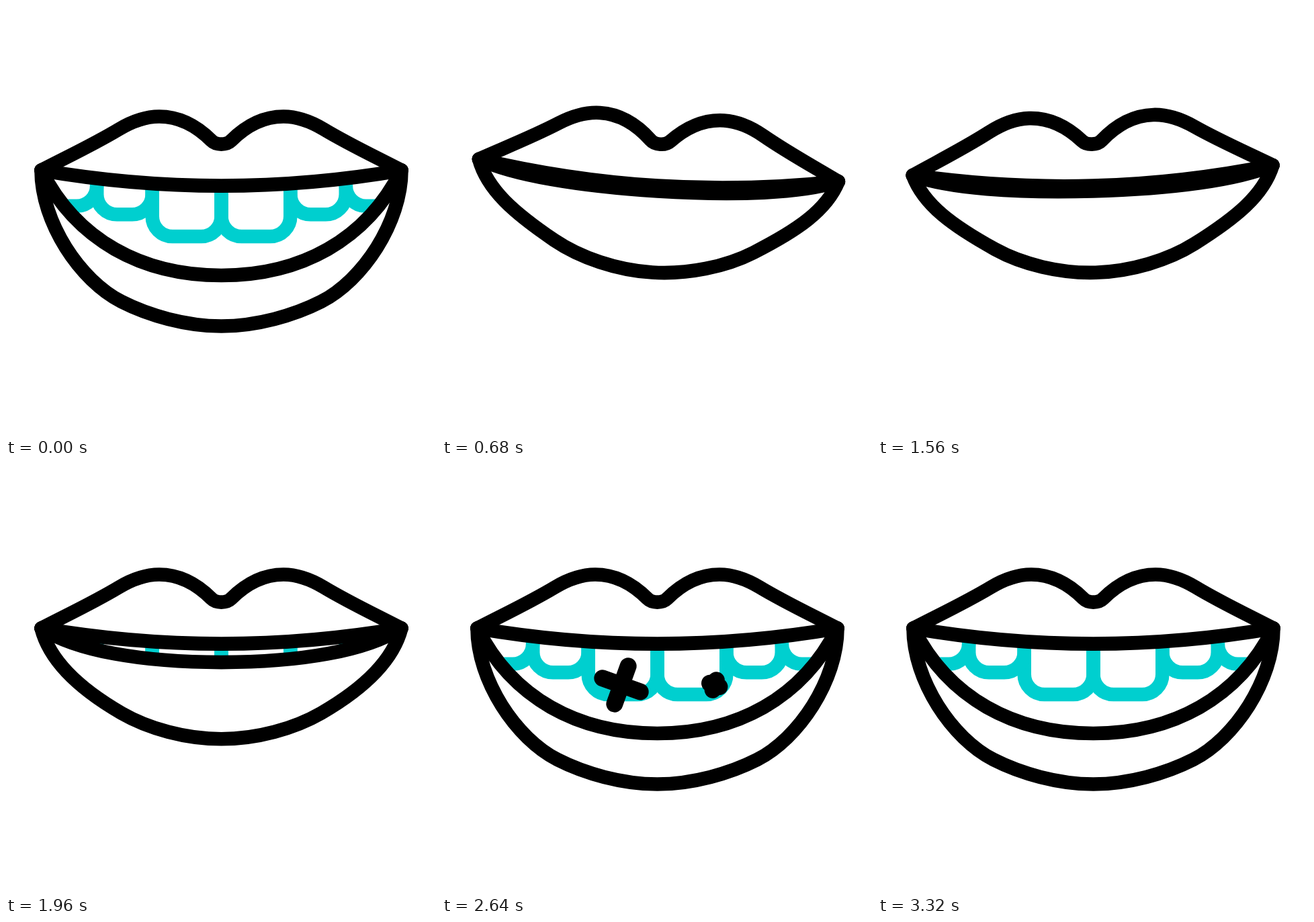
Write an HTML page with a canvas that moves like this. It is 640 by 640 pixels and loops after 3.68 s.

```html
<!DOCTYPE html>
<html lang="en">
<head>
<meta charset="utf-8">
<title>Smile</title>
<style>
  html, body { margin: 0; width: 100%; height: 100%; overflow: hidden; background: #fff; }
  canvas { display: block; width: 640px; height: 640px; }
</style>
</head>
<body>
<canvas id="stage" width="640" height="640"></canvas>
<script>
const ctx = document.getElementById('stage').getContext('2d');
const LOOP = 3680, STEP = 40;
const INK = '#000', TEAL = '#00cfcf', LINE = 20.6;
const MID = 320.5, EDGE = 52.5, TOP = 244.5, PIVOT = 276;

const mix = (a, b, k) => a + (b - a) * k;

function ramp(t, start, length) {
  const u = Math.min(1, Math.max(0, (t - start) / length));
  return u * u * (3 - 2 * u);
}

// Motion
const shutAt = t => ramp(t, 0, 480) - ramp(t, 1840, 480);

// Five equal swings, the extremes going 4, -4, 2, -2 degrees and back to rest.
function tiltAt(t) {
  const start = 360, swing = 280;
  const extreme = i => i < 1 || i > 4 ? 0 : (i % 2 ? 4 : -4) / Math.ceil(i / 2);
  const i = Math.floor((t - start) / swing);
  const angle = mix(extreme(i), extreme(i + 1), ramp(t, start + i * swing, swing));
  return angle * Math.PI / 180;
}

function markSizeAt(t, i) {
  const start = 2340 + 180 * i;
  return ramp(t, start, 400) - ramp(t, start + 460, 320);
}

// Each curve is a left half of cubic points, mirrored at the middle.
const mirror = pts =>
  pts.concat(pts.slice(0, -1).reverse().map(([x, y]) => [2 * MID - x, y]));

// Smooth curve through nodes of x, y and slope
function spline(nodes) {
  const pts = [nodes[0].slice(0, 2)];
  for (let i = 1; i < nodes.length; i++) {
    const [x0, y0, s0] = nodes[i - 1], [x1, y1, s1] = nodes[i];
    const h = (x1 - x0) / 3;
    pts.push([x0 + h, y0 + h * s0], [x1 - h, y1 - h * s1], [x1, y1]);
  }
  return mirror(pts);
}

const upperLip = spline([
  [EDGE, TOP, -0.52], [168, 183.5, -0.6], [228, 164.5, 0], [306, 200.5, 1], [MID, 205.6, 0]
]);
const mouthLine = spline([[EDGE, TOP, 0.172], [MID, 267.6, 0]]);

function innerLip(shut) {
  const sag = mix(156.5, 31, shut);
  return mirror([[EDGE, TOP], [EDGE * 2, TOP + sag * 0.668], [203, TOP + sag], [MID, TOP + sag]]);
}

function outerLip(shut) {
  const low = mix(476.5, 396.8, shut);
  const hipX = 172, hipY = mix(440, 358, shut), slope = mix(0.51, 0.59, shut);
  return mirror([
    [EDGE, TOP], [EDGE + 15 * shut, mix(322, 289, shut)],
    [hipX - 62, hipY - 62 * slope], [hipX, hipY], [hipX + 40, hipY + 40 * slope],
    [268, low], [MID, low]
  ]);
}

// Drawing
function curve(pts, join) {
  if (join) ctx.lineTo(...pts[0]);
  else ctx.moveTo(...pts[0]);
  for (let i = 1; i < pts.length; i += 3) {
    ctx.bezierCurveTo(...pts[i], ...pts[i + 1], ...pts[i + 2]);
  }
}

function strokeCurve(pts) {
  ctx.beginPath();
  curve(pts);
  ctx.stroke();
}

function drawTooth(near, far, bottom) {
  ctx.beginPath();
  ctx.moveTo(MID + near, 240);
  ctx.arcTo(MID + near, bottom, MID + far, bottom, 30);
  ctx.arcTo(MID + far, bottom, MID + far, 240, 30);
  ctx.lineTo(MID + far, 240);
  ctx.stroke();
}

function drawTeeth(inner) {
  ctx.save();
  ctx.beginPath();
  curve(mouthLine);
  curve(inner.slice().reverse(), true);
  ctx.closePath();
  ctx.clip();
  ctx.strokeStyle = TEAL;
  for (const side of [-1, 1]) {
    let near = 0;
    for (const [width, bottom] of [[102.8, 343], [82.5, 310.3], [95, 297.8]]) {
      drawTooth(side * near, side * (near + width), bottom);
      near += width;
    }
  }
  ctx.restore();
}

function drawMark(x, size) {
  if (size <= 0) return;
  const arm = 35.5 * size;
  ctx.save();
  ctx.translate(x, 328.9);
  ctx.rotate(0.345);
  ctx.lineWidth = 25;
  ctx.beginPath();
  ctx.moveTo(-arm, 0);
  ctx.lineTo(arm, 0);
  ctx.moveTo(0, -arm);
  ctx.lineTo(0, arm);
  ctx.stroke();
  ctx.restore();
}

function draw(t) {
  const shut = shutAt(t), inner = innerLip(shut);
  ctx.fillStyle = '#fff';
  ctx.fillRect(0, 0, 640, 640);
  ctx.save();
  ctx.translate(MID, PIVOT);
  ctx.rotate(tiltAt(t));
  ctx.translate(-MID, -PIVOT);
  ctx.lineCap = ctx.lineJoin = 'round';
  ctx.lineWidth = LINE;
  drawTeeth(inner);
  ctx.strokeStyle = INK;
  [upperLip, mouthLine, inner, outerLip(shut)].forEach(strokeCurve);
  [267, 405.7].forEach((x, i) => drawMark(x, markSizeAt(t, i)));
  ctx.restore();
}

const start = performance.now();
function tick() {
  const t = Math.max(0, performance.now() - start) % LOOP;
  draw(Math.floor(t / STEP) * STEP);
  requestAnimationFrame(tick);
}
tick();
</script>
</body>
</html>
```
